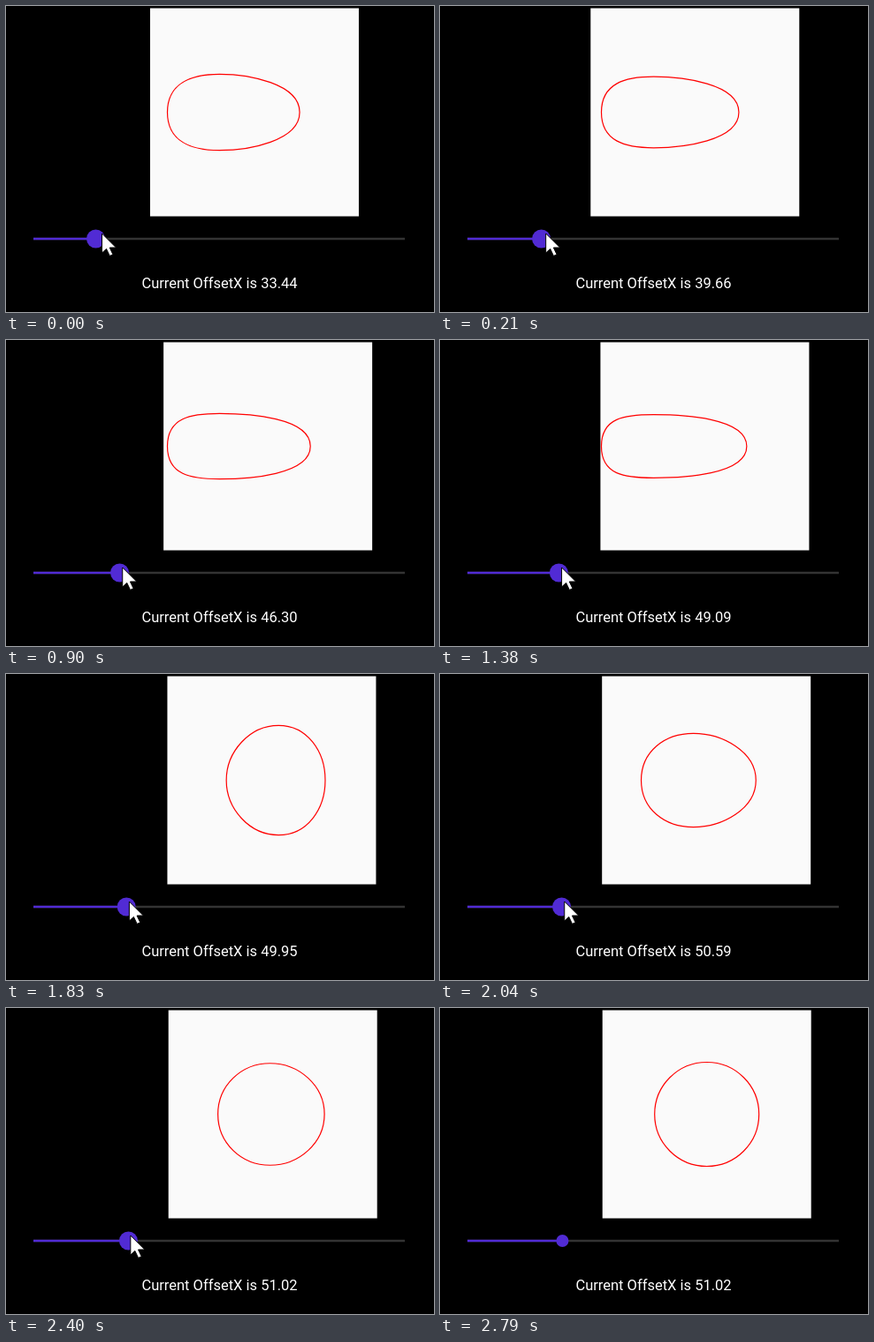
Animation, 484 px wide and 347 px high, one loop 3360 ms. Source, as an HTML page:

```html
<!DOCTYPE html>
<html lang="en">
<head>
<meta charset="utf-8">
<title>Elastic ball slider</title>
<style>
html, body { margin: 0; width: 100%; height: 100%; overflow: hidden; background: #000; }
svg { display: block; width: 484px; height: 347px; }
text { font: 16.5px Roboto, sans-serif; fill: #fff; text-anchor: middle; }
</style>
</head>
<body>
<svg viewBox="0 0 484 347">
  <rect id="card" y="2.5" width="236" height="236" fill="#fafafa"/>
  <path id="ball" fill="none" stroke="#f00" stroke-width="1.2"/>
  <path d="M31 264H451" stroke="#333" stroke-width="2.4"/>
  <path id="track" stroke="#512bd4" stroke-width="2.4"/>
  <circle id="thumb" cy="264" fill="#512bd4"/>
  <text id="label" x="241.5" y="320"></text>
  <path id="cursor" d="M0 0V22l5-4.6 3.8 8 3.6-1.6-3.7-7.8H16Z" fill="#fff" stroke="#000"/>
</svg>
<script>
const LOOP = 3360, TICK = 30, SCALE = 1.18, MID = 120.5, R = 50 * SCALE, RELEASE = 1740;

// [time, slider steps]
const DRAG = [[0, 0], [120, 18], [240, 33], [330, 41], [420, 47], [540, 53], [750, 56], [900, 60],
  [990, 64], [1080, 64], [1380, 73], [1500, 73], [1560, 75], [1740, 75], [2040, 80], [2280, 82]];
// [time, pointer lead over the thumb]
const LEAD = [[0, 7], [420, 3.2], [2040, 3.2], [2280, 2.4]];

const el = id => document.getElementById(id);
const card = el('card'), ball = el('ball'), track = el('track'),
  thumb = el('thumb'), label = el('label'), cursor = el('cursor');
const set = (node, attrs) => { for (const k in attrs) node.setAttribute(k, attrs[k]); };
const ramp = (t, a, b) => Math.min(1, Math.max(0, (t - a) / (b - a)));

function along(keys, t) {
  const i = keys.findIndex(k => k[0] > t);
  if (i < 0) return keys[keys.length - 1][1];
  const [t0, a] = keys[i - 1], [t1, b] = keys[i];
  return a + (b - a) * ramp(t, t0, t1);
}

// Pulling by d moves the left tip and flattens the other sides
function ballPath(cx, d) {
  const c = R * 0.5523, x = cx - d, h = R - 0.4 * d;
  const left = x - R, right = cx + R - 0.2 * d, top = MID - h, low = MID + h;
  return `M${x} ${top}C${x + c} ${top} ${right} ${MID - c} ${right} ${MID}` +
    `S${x + c} ${low} ${x} ${low}S${left} ${MID + c} ${left} ${MID}` +
    `S${x - c} ${top} ${x} ${top}Z`;
}

function pull(t, value) {
  if (t <= RELEASE) return value * SCALE;
  if (t >= 2760) return 0;
  const s = (t - RELEASE) / 1000;
  return 58.6 * Math.exp(-4.35 * s) * Math.cos(2 * Math.PI * s / 0.32);
}

function draw(now) {
  const t = Math.floor(now % LOOP / TICK) * TICK;
  const value = 33.44 + 0.21438 * Math.round(along(DRAG, t));
  const left = 123.5 + SCALE * value, x = 31.3 + 2.1 * value;
  set(card, { x: left });
  set(ball, { d: ballPath(left + 118, pull(t, value)) });
  set(track, { d: `M31 264H${x}` });
  set(thumb, { cx: x, r: 10.5 - 3.5 * ramp(t, 2610, 2730) });
  label.textContent = 'Current OffsetX is ' + value.toFixed(2);

  const exit = ramp(t, 2580, 2760) ** 2;
  set(cursor, {
    transform: `translate(${x + along(LEAD, t) + 300 * exit} ${258 - 30 * exit})`,
    visibility: t < 2790 ? 'visible' : 'hidden'
  });
}

const start = performance.now();
function frame() {
  draw(performance.now() - start);
  requestAnimationFrame(frame);
}
frame();
</script>
</body>
</html>
```
